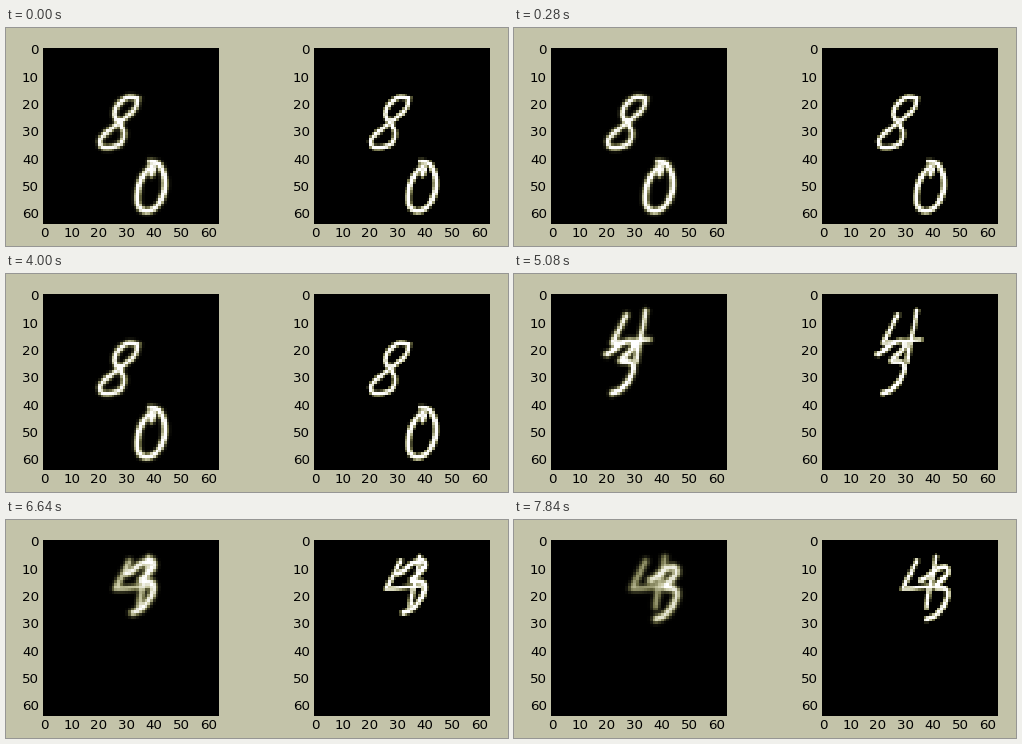
Recreate the animation shown at these times as a matplotlib script. Size 502 by 218 pixels, loop 8 s.

```python
import numpy as np
import matplotlib.pyplot as plt
from matplotlib.animation import FuncAnimation
from matplotlib.colors import LinearSegmentedColormap

W, H, DPI = 502, 218, 100
SIDE, GRID = 175, 64
STEP_MS, LOOP_MS = 40, 8000
PAPER = "#c3c3a9"
GLOW = LinearSegmentedColormap.from_list(
    "glow", [(0, "#000000"), (0.4, "#6b6b42"), (0.75, "#cacaa6"), (1, "#ffffff")])

plt.rcParams.update({"font.family": "DejaVu Sans", "font.size": 9.6})

# Strokes in grid units, (x, y) with y pointing down
EIGHT = [(34, 18.3), (30.5, 17.8), (27, 20.3), (25.5, 24), (27, 26.8),
         (29, 30.5), (28, 34.3), (24.5, 36), (21, 35.8), (20.3, 33.3),
         (22.5, 30.8), (26, 28), (29.5, 25.3), (33, 22), (34, 18.3)]
ZERO = [(38.5, 41.2), (41.5, 42), (43.5, 46), (43.8, 51), (42, 56),
        (39, 58.8), (36, 59), (34, 56.5), (34, 52), (35.3, 47.5),
        (37.5, 44.3), (39.5, 43.5), (39, 46)]
FOUR_ARM = [(27, 7.5), (24.5, 12.5), (21.8, 17.6)]
FOUR_BAR = [(21.8, 17.6), (26, 17.4), (31, 16.8), (35.3, 16.5)]
FOUR_STEM = [(34, 6), (33, 12), (31.5, 18), (30.5, 24.5)]
THREE = [(19.7, 21.8), (22, 20.5), (25, 18), (28.5, 16.9), (29.5, 19),
         (27, 22), (24.8, 24.3), (28.5, 24.8), (29.5, 27), (28, 31),
         (25, 34.5), (21.7, 36)]

# Times at which the second pair jumps to its next place
JUMPS = [4040, 4720, 5080, 5400, 5760, 6120, 6520, 6880, 7240, 7720]
START = 2      # jump at which the second pair sits where it is defined above
BOUNCE = 7     # jump at which the three turns back down


def smooth(points, n=10):
    """Catmull-Rom curve through the points."""
    p = np.array(points, float)
    p = np.vstack([2 * p[0] - p[1], p, 2 * p[-1] - p[-2]])
    t = np.linspace(0, 1, n)[:, None]
    parts = []
    for a, b, c, d in zip(p, p[1:], p[2:], p[3:]):
        parts.append(0.5 * (2 * b + (c - a) * t + (2 * a - 5 * b + 4 * c - d) * t**2
                            + (3 * b - a - 3 * c + d) * t**3))
    return np.vstack(parts)


def ink(strokes, half, shift=(0, 0)):
    """Coverage of pen strokes on the grid."""
    pts = np.vstack([smooth(s) for s in strokes]) + shift
    y, x = np.mgrid[:GRID, :GRID]
    d2 = (x[..., None] - pts[:, 0])**2 + (y[..., None] - pts[:, 1])**2
    return np.clip(half + 0.5 - np.sqrt(d2.min(axis=2)), 0, 1)


def blur(img, sigma):
    k = np.exp(-0.5 * (np.arange(-3, 4) / sigma)**2)
    k /= k.sum()
    for axis in (0, 1):
        img = np.apply_along_axis(np.convolve, axis, img, k, "same")
    return img


def first_pair():
    img = np.maximum(ink([EIGHT], 0.85), ink([ZERO], 0.95))
    return np.clip(blur(img, 0.5) * 1.15, 0, 1), img


def second_pair(jump):
    n = jump - START
    four = ink([FOUR_ARM, FOUR_BAR, FOUR_STEM], 0.8, (n, 0))
    x = 2.58 * min(n, 4) + 1.83 * max(n - 4, 0)
    up = 2.4 * (n if jump <= BOUNCE else 2 * (BOUNCE - START) - n)
    three = ink([THREE], 0.95, (x, -up))
    fade = 1 - 0.04 * max(n, 0)
    guess = blur(np.maximum(four * fade, three), 0.55 + 0.03 * max(n, 0))
    return np.clip(guess * 1.2, 0, 1), np.maximum(four, three)


scenes = [first_pair()] + [second_pair(j) for j in range(len(JUMPS))]

# The small surplus keeps the pixel size from rounding down
fig = plt.figure(figsize=((W + 0.01) / DPI, (H + 0.01) / DPI), dpi=DPI,
                 facecolor=PAPER)


def panel(left, img):
    ax = fig.add_axes([left / W, 1 - 195 / H, SIDE / W, SIDE / H])
    art = ax.imshow(img, cmap=GLOW, vmin=0, vmax=1, interpolation="nearest",
                    aspect="auto")
    ax.set_xticks(range(0, 61, 10))
    ax.set_yticks(range(0, 61, 10))
    ax.tick_params(length=0, pad=2.9)
    for spine in ax.spines.values():
        spine.set_linewidth(0.72)
    return art


panels = [panel(x, img) for x, img in zip((37, 308), scenes[0])]


def update(i):
    now = i * STEP_MS
    scene = scenes[sum(now >= t for t in JUMPS)]
    for art, img in zip(panels, scene):
        art.set_data(img)
    return panels


anim = FuncAnimation(fig, update, frames=LOOP_MS // STEP_MS, interval=STEP_MS,
                     repeat=True, repeat_delay=0)
plt.show()
```
